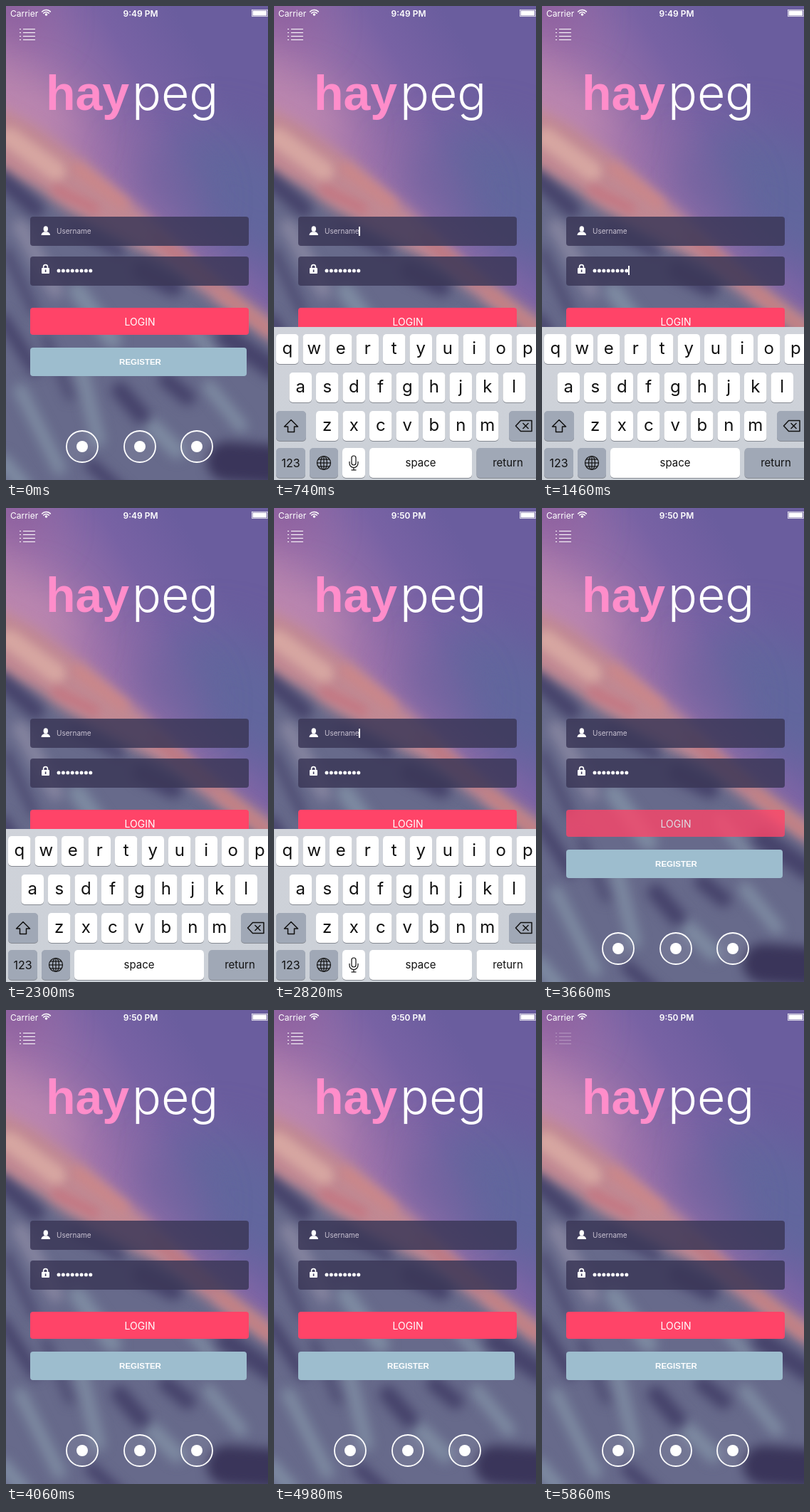
These frames come from a looping animation (368 by 666 pixels, 5.96 s). An HTML page with a canvas:

```html
<!DOCTYPE html>
<html lang="en">
<head>
<meta charset="utf-8">
<title>Login screen</title>
<style>
html, body { margin: 0; width: 100%; height: 100%; overflow: hidden; background: #5a5688; }
canvas { display: block; }
</style>
</head>
<body>
<canvas id="stage" width="368" height="666"></canvas>
<script>
const W = 368, H = 666, LOOP = 5960, STEP = 20;
const KEYBOARD_H = 215;
const UI = 'Inter, Roboto, sans-serif';
const HELV = '"Liberation Sans", Arial, sans-serif';
const ctx = document.getElementById('stage').getContext('2d');

const ramp = (t, a, b) => Math.min(1, Math.max(0, (t - a) / (b - a)));
// Critically damped spring, 0 to 1
const spring = (ms, w = 26) => {
  const x = w * Math.max(0, ms) / 1000;
  return 1 - (1 + x) * Math.exp(-x);
};

function box(c, x, y, w, h, r, fill) {
  c.fillStyle = fill;
  c.beginPath();
  c.roundRect(x, y, w, h, r);
  c.fill();
}

function label(c, str, x, y, font, fill, align = 'left') {
  c.font = font;
  c.fillStyle = fill;
  c.textAlign = align;
  c.fillText(str, x, y);
}

function disc(c, x, y, r) {
  c.beginPath();
  c.arc(x, y, r, 0, Math.PI * 2);
  c.fill();
}

function line(c, ...pts) {
  c.beginPath();
  for (let i = 0; i < pts.length; i += 2) c.lineTo(pts[i], pts[i + 1]);
}

function layer(w, h, paint) {
  const el = document.createElement('canvas');
  el.width = w;
  el.height = h;
  paint(el.getContext('2d'));
  return el;
}

function paintScenery(c) {
  const sky = c.createLinearGradient(0, 200, 260, 40);
  sky.addColorStop(0, '#c48cae');
  sky.addColorStop(.35, '#9d73ab');
  sky.addColorStop(.7, '#7862a4');
  sky.addColorStop(1, '#6a5d9e');
  c.fillStyle = sky;
  c.fillRect(0, 0, W, H);

  const blob = (x, y, rx, ry, fill) => {
    c.fillStyle = fill;
    c.beginPath();
    c.ellipse(x, y, rx, ry, .62, 0, Math.PI * 2);
    c.fill();
  };
  const area = (fill, ...pts) => {
    line(c, ...pts);
    c.fillStyle = fill;
    c.fill();
  };
  const streak = (x1, y1, x2, y2, width, stroke) => {
    line(c, x1, y1, x2, y2);
    c.lineWidth = width;
    c.strokeStyle = stroke;
    c.stroke();
  };
  const dark = '#45426a', pale = '#7e8ba2';
  c.lineCap = 'round';

  c.filter = 'blur(32px)';
  blob(0, 0, 60, 40, '#8a5c9c');
  blob(340, 270, 130, 75, '#61669d');
  blob(225, 250, 60, 30, '#74639f');
  blob(50, 150, 60, 22, '#c98fb2');

  // Rock slope under the sunlit ridge
  c.filter = 'blur(9px)';
  area('#676a8b', -40, 190, 130, 275, 410, 470, 410, 710, -40, 710);
  area('#c18993', -40, 125, 40, 168, 110, 218, 200, 296, 290, 380, 410, 466,
    410, 496, 300, 420, 225, 362, 150, 322, 90, 290, 40, 255, -40, 218);

  c.filter = 'blur(7px)';
  streak(5, 185, 70, 232, 28, '#d6a6a1');
  streak(70, 258, 125, 285, 12, '#c4747f');
  streak(100, 228, 165, 278, 14, '#cb8688');
  streak(210, 325, 290, 390, 14, '#bd7680');
  streak(300, 400, 368, 456, 12, '#c47f80');

  c.filter = 'blur(8px)';
  streak(20, 310, 70, 400, 22, '#85849f');
  streak(100, 400, 150, 470, 24, pale);
  streak(250, 440, 300, 500, 16, pale);
  streak(105, 510, 130, 610, 18, pale);
  streak(205, 590, 240, 625, 22, pale);
  streak(285, 535, 330, 590, 18, pale);
  streak(20, 540, 75, 650, 18, pale);
  streak(-5, 640, 25, 675, 22, pale);

  streak(-10, 240, 42, 285, 24, dark);
  streak(95, 312, 160, 345, 14, dark);
  streak(190, 372, 235, 395, 26, dark);
  streak(0, 345, 40, 430, 10, dark);
  streak(-5, 440, 40, 510, 18, dark);
  streak(55, 465, 90, 550, 9, dark);
  streak(160, 540, 190, 575, 24, dark);
  streak(225, 525, 255, 550, 22, dark);
  streak(310, 465, 375, 510, 28, dark);
  streak(310, 640, 380, 645, 56, '#3a355a');
  streak(120, 645, 165, 685, 18, dark);
  c.filter = 'none';
}

function paintStatus(c) {
  label(c, 'Carrier', 6, 14.5, `400 12px ${UI}`, '#fff');
  c.strokeStyle = '#fff';
  c.lineWidth = 1.6;
  for (const r of [8, 5]) {
    c.beginPath();
    c.arc(56.5, 13.5, r, -Math.PI * .76, -Math.PI * .24);
    c.stroke();
  }
  c.fillStyle = '#fff';
  disc(c, 56.5, 12, 1.8);
  c.lineWidth = .7;
  c.strokeRect(345.4, 5.4, 22, 9.2);
  c.fillRect(346.5, 6.5, 19.5, 7);
}

function paintForm(c) {
  label(c, 'hay', 56, 146, `700 68px ${HELV}`, '#ff8dca');
  label(c, 'peg', 177, 146, `300 68px ${UI}`, '#fff');

  for (const y of [296, 352]) box(c, 34, y, 307, 41, 4, 'rgba(59,55,88,.84)');
  label(c, 'Username', 71, 320, `400 10px ${UI}`, '#c9c2d2');

  c.fillStyle = '#fff';
  c.beginPath();
  c.ellipse(55.8, 313.2, 3.2, 3.9, 0, 0, Math.PI * 2);
  c.fill();
  c.beginPath();
  c.moveTo(49.5, 322);
  c.quadraticCurveTo(49.8, 318.5, 53.5, 317.3);
  c.lineTo(58, 317.3);
  c.quadraticCurveTo(61.8, 318.5, 62, 322);
  c.fill();

  box(c, 50, 368, 11, 8, 1, '#fff');
  c.strokeStyle = '#fff';
  c.lineWidth = 1.6;
  c.beginPath();
  c.moveTo(52.6, 369);
  c.lineTo(52.6, 366.5);
  c.arc(55.5, 366.5, 2.9, Math.PI, 0);
  c.lineTo(58.4, 369);
  c.stroke();
  c.fillStyle = '#3d395b';
  c.fillRect(54.8, 370.5, 1.6, 3.4);

  c.fillStyle = '#fff';
  for (let i = 0; i < 8; i++) disc(c, 74 + i * 6.4, 372, 2.5);

  box(c, 34, 480, 304, 40, 4, '#9dbdce');
  label(c, 'REGISTER', 188.5, 504, `700 11.5px ${HELV}`, '#fff', 'center');

  c.strokeStyle = '#fff';
  c.lineWidth = 1.8;
  for (const x of [107, 188, 268]) {
    c.fillStyle = 'rgba(255,255,255,.08)';
    disc(c, x, 619, 22);
    c.stroke();
    c.fillStyle = '#fff';
    disc(c, x, 619, 8);
  }
}

function paintMenu(c) {
  c.fillStyle = '#fff';
  for (let i = 0; i < 4; i++) {
    const y = 32 + i * 5;
    c.fillRect(19, y, 2, 1);
    c.fillRect(24, y, 17, 1);
  }
}

const GREY = '#a0a8b6';

// Coordinates are those of the raised keyboard
function paintKeyboard(c, mic, returnDown) {
  c.save();
  c.translate(0, -(H - KEYBOARD_H));
  const back = c.createLinearGradient(0, 451, 0, H);
  back.addColorStop(0, '#d0d3da');
  back.addColorStop(1, '#cbd0d7');
  c.fillStyle = back;
  c.fillRect(0, 451, W, KEYBOARD_H);

  const key = (x, y, w, fill = '#fff') => {
    box(c, x, y + 1, w, 42, 5, '#868a92');
    box(c, x, y, w, 42, 5, fill);
  };
  const row = (letters, x, y) => [...letters].forEach((ch, i) => {
    const left = x + i * 37.5;
    key(left, y, 31.5);
    label(c, ch, left + 15.75, y + 28, `400 24px ${UI}`, '#111', 'center');
  });
  row('qwertyuiop', 3, 461);
  row('asdfghjkl', 21.5, 515);
  row('zxcvbnm', 59, 569);
  key(3, 569, 42, GREY);
  key(330, 569, 42, GREY);
  key(3, 621, 41, GREY);
  key(50, 621, 40, GREY);
  if (mic) key(96, 621, 32);
  const spaceX = mic ? 134 : 96;
  key(spaceX, 621, 278 - spaceX);
  key(284.5, 621, 90, returnDown ? '#fff' : GREY);

  const small = `400 15px ${UI}`;
  label(c, '123', 23.5, 648, `400 16px ${UI}`, '#111', 'center');
  label(c, 'space', (spaceX + 278) / 2, 647, small, '#111', 'center');
  label(c, 'return', 328.5, 647, small, '#111', 'center');

  c.strokeStyle = '#111';
  c.lineWidth = 1.5;
  c.lineJoin = 'round';
  // Shift
  line(c, 24, 581.5, 33.5, 591, 28.5, 591, 28.5, 598.5, 19.5, 598.5, 19.5, 591, 14.5, 591);
  c.closePath();
  c.stroke();
  // Delete
  line(c, 339.5, 590, 346.5, 582.5, 362, 582.5, 362, 597.5, 346.5, 597.5);
  c.closePath();
  c.stroke();
  line(c, 349.5, 586, 357.5, 594);
  c.stroke();
  line(c, 357.5, 586, 349.5, 594);
  c.stroke();
  // Globe
  c.lineWidth = 1.2;
  for (const rx of [9.5, 4.5]) {
    c.beginPath();
    c.ellipse(70, 642, rx, 9.5, 0, 0, Math.PI * 2);
    c.stroke();
  }
  line(c, 70, 632.5, 70, 651.5);
  c.stroke();
  for (const [dy, half] of [[-5, 8], [0, 9.5], [5, 8]]) {
    line(c, 70 - half, 642 + dy, 70 + half, 642 + dy);
    c.stroke();
  }
  if (mic) {
    c.beginPath();
    c.roundRect(109, 632, 6, 13, 3);
    c.stroke();
    c.beginPath();
    c.moveTo(106, 640);
    c.lineTo(106, 642.5);
    c.arc(112, 642.5, 6, Math.PI, 0, true);
    c.lineTo(118, 640);
    c.stroke();
    line(c, 112, 648.5, 112, 652);
    c.stroke();
    line(c, 108.5, 652, 115.5, 652);
    c.stroke();
  }
  c.restore();
}

const screen = layer(W, H, c => {
  paintScenery(c);
  paintStatus(c);
  paintForm(c);
});
const menu = layer(W, 60, paintMenu);
const login = layer(W, H, c => {
  box(c, 34, 424, 307, 38, 4, '#ff4468');
  label(c, 'LOGIN', 188, 448.5, `400 14px ${UI}`, '#fff', 'center');
});
const keyboard = (mic, down) => layer(W, KEYBOARD_H, c => paintKeyboard(c, mic, down));
const keys = { text: keyboard(true, false), secret: keyboard(false, false), pressed: keyboard(true, true) };

function keyboardRise(t) {
  if (t < 2960) return spring(t - 400);
  const p = 1 - ramp(t, 2960, 3080);
  return p * p * (3 - 2 * p);
}

function caretAlpha(t) {
  if (t < 420) return 0;
  if (t < 1460) return t < 1320 ? 1 - ramp(t, 1020, 1140) : 1;
  if (t < 2580) {
    return 1 - ramp(t, 1560, 1680) + ramp(t, 1840, 1940)
      - ramp(t, 2120, 2240) + ramp(t, 2340, 2440);
  }
  return t < 2820 ? 1 - ramp(t, 2680, 2800) : 1 - ramp(t, 2960, 3080);
}

function loginAlpha(t) {
  return t < 3500 ? 1 : .2 + .8 * spring(t - 3560);
}

function draw(layerEl, alpha, y = 0) {
  ctx.globalAlpha = alpha;
  ctx.drawImage(layerEl, 0, y);
  ctx.globalAlpha = 1;
}

function render(t) {
  const secret = t >= 1460 && t < 2580;
  draw(screen, 1);
  label(ctx, t < 2580 ? '9:49 PM' : '9:50 PM', 189, 14.5, `600 12px ${UI}`, '#fff', 'center');
  draw(menu, 1 - .7 * ramp(t, 5800, 5860));
  draw(login, loginAlpha(t));

  ctx.globalAlpha = caretAlpha(t);
  ctx.fillStyle = '#fff';
  ctx.fillRect(secret ? 121 : 119, secret ? 365 : 310, 2, 13);
  ctx.globalAlpha = 1;

  const rise = keyboardRise(t);
  if (rise > 0) {
    const pressed = t >= 2820 && t < 2980;
    const face = secret ? keys.secret : pressed ? keys.pressed : keys.text;
    draw(face, 1, Math.round(H - KEYBOARD_H * rise));
  }
}

const start = performance.now();
function tick() {
  const t = (performance.now() - start) % LOOP;
  render(Math.floor(t / STEP) * STEP);
  requestAnimationFrame(tick);
}
tick();
</script>
</body>
</html>
```
